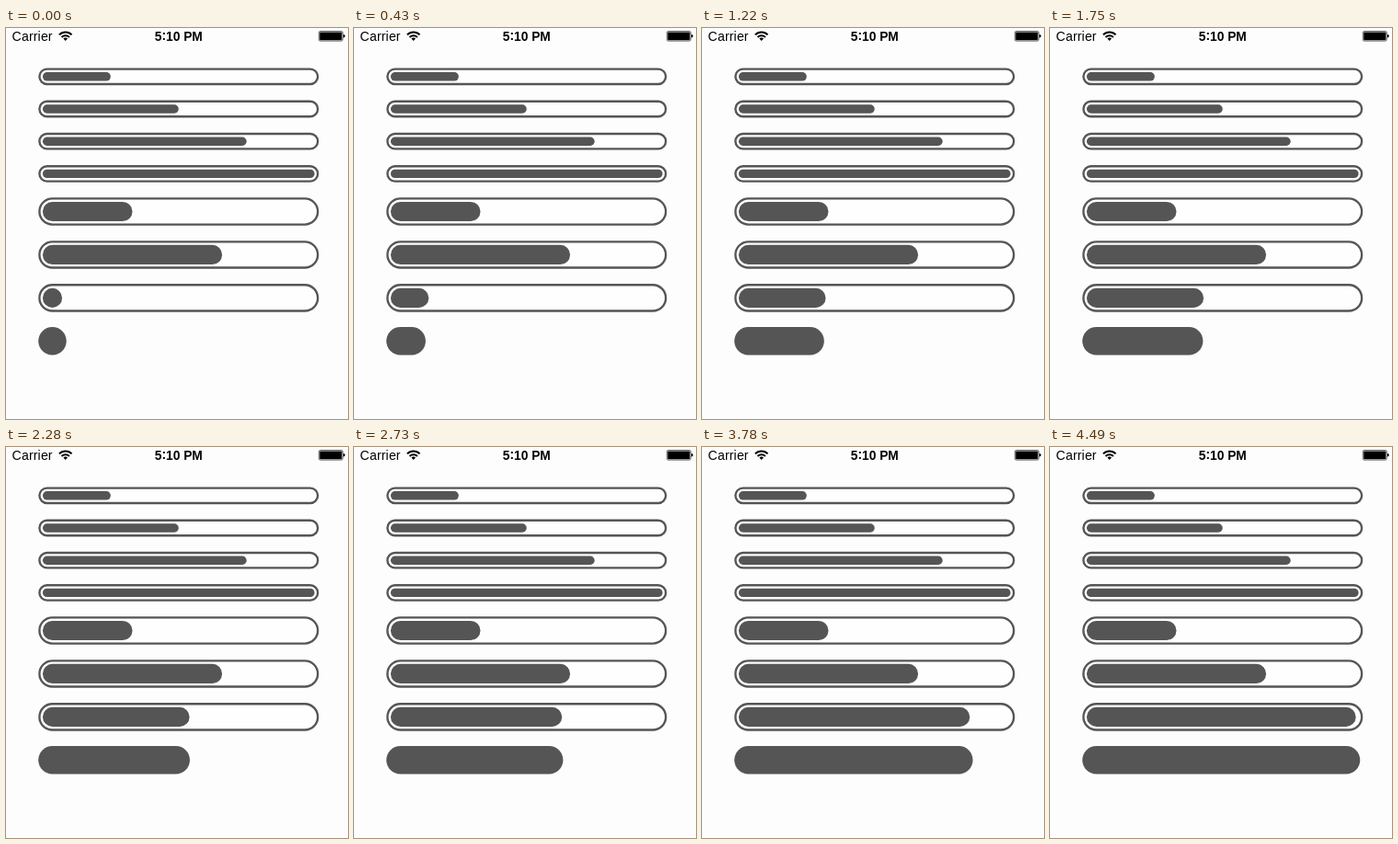
Recreate the animation shown at these times as an HTML page. Size 372 px wide and 425 px high, loop 4.53 s.

```html
<!DOCTYPE html>
<html lang="en">
<head>
<meta charset="utf-8">
<title>Progress bars</title>
<style>
html, body { margin: 0; width: 100%; height: 100%; overflow: hidden; background: #fdfdfd; }
svg { display: block; }
text { font-family: "Liberation Sans", Arial, sans-serif; }
</style>
</head>
<body>
<svg width="372" height="425" viewBox="0 0 372 425">
  <text x="6.6" y="14" font-size="14.1" letter-spacing=".15">Carrier</text>
  <g fill="none" stroke="#000" stroke-width="2">
    <path d="M57.9 7.4a9.6 9.6 0 0 1 13.6 0M60.5 10a6 6 0 0 1 8.4 0"/>
    <path d="M64.7 14l-2.3-2.4a3.3 3.3 0 0 1 4.6 0z" fill="#000" stroke="none"/>
  </g>
  <text x="161.7" y="14" font-size="13.8" font-weight="bold">5<tspan dy="-1">:</tspan><tspan dy="1">10 PM</tspan></text>
  <rect x="340.3" y="3.5" width="26" height="10.6" rx="1.6" fill="none" stroke="#000" stroke-width=".6"/>
  <rect x="341.2" y="4.4" width="24.2" height="8.8" rx=".8"/>
  <path d="M367 7a1.8 1.8 0 0 1 0 3.6z"/>
  <g id="bars" transform="scale(1.1735)" fill="#555"></g>
</svg>
<script>
const LOOP = 4530, STEPS = 52;
const shortSteps = [3, 5, 7, 12, 16, 23, 34, 36, 41, 43]; // these last 80 ms, the others 90 ms
const bars = document.getElementById('bars');

function pill(x, y, width, height, attrs = {}) {
  const el = document.createElementNS('http://www.w3.org/2000/svg', 'rect');
  Object.entries({ x, y, width, height, rx: height / 2, ...attrs })
    .forEach(([name, value]) => el.setAttribute(name, value));
  return bars.appendChild(el);
}

function progressBar(y, height, progress) {
  pill(31, y + 1, 258, height - 2, { fill: '#fefefe', stroke: '#555', 'stroke-width': 2 });
  return pill(34, y + 4, 252 * progress, height - 8);
}

[.25, .5, .75, 1].forEach((p, i) => progressBar(37 + 30 * i, 16, p));
progressBar(157, 26, .33);
progressBar(197, 26, .66);
const framed = progressBar(237, 26, 0);
const plain = pill(30, 277, 0, 26);

const starts = [0];
for (let i = 1; i < STEPS; i++) {
  starts.push(starts[i - 1] + (shortSteps.includes(i - 1) ? 80 : 90));
}

function draw(now) {
  const t = now % LOOP;
  const step = starts.filter(s => s <= t).length - 1;
  const progress = Math.round(7 + 1.81 * step) / 100;
  framed.setAttribute('width', Math.max(18, 252 * progress));
  plain.setAttribute('width', Math.max(26, 260 * progress));
}

const began = performance.now();
function tick() {
  draw(performance.now() - began);
  requestAnimationFrame(tick);
}
tick();
</script>
</body>
</html>
```
